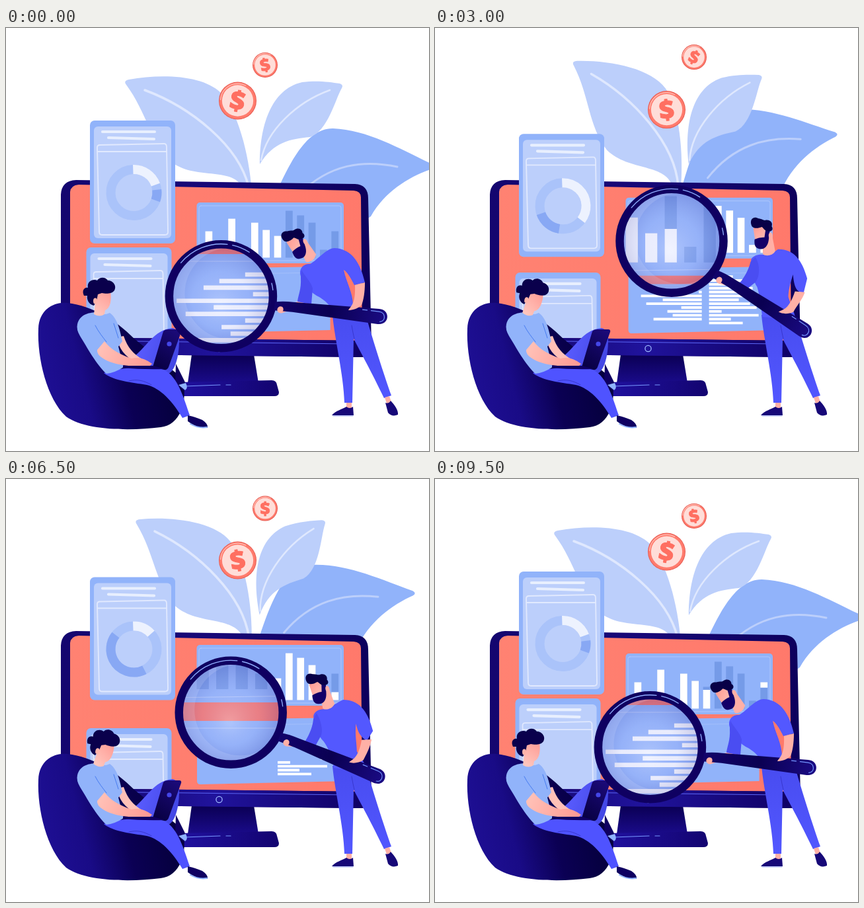
An HTML page with a canvas that plays this animation: 640x640 px, repeating every 9.57 s.

```html
<!DOCTYPE html>
<html lang="en">
<head>
<meta charset="utf-8">
<title>Data research</title>
<style>
html, body { margin: 0; width: 100%; height: 100%; overflow: hidden; background: #fff; }
canvas { display: block; width: 100%; height: 100%; }
</style>
</head>
<body>
<canvas id="stage" width="640" height="640"></canvas>
<script>
const ctx = document.getElementById('stage').getContext('2d');
const LOOP = 9570, STEP = 1000 / 14;
const KEYS = [0, 1930, 3930, 5290, 6500, 8210, LOOP];
const SKY = '#91b3fa', PALE = '#bccffb', VEIN = '#dfe8fe', NAVY = '#0f0061',
  BLUE = '#4f53ff', SKIN = '#ffb0a6', DARKBAR = '#759be8';

const clamp = v => Math.max(0, Math.min(1, v));
const lerp = (a, b, q) => a + (b - a) * q;
const ramp = (t, a, b) => clamp((t - a) / (b - a));
const segment = t => { let i = 0; while (i < 5 && t >= KEYS[i + 1]) i++; return i; };

function linear(t, v) {
  const i = segment(t);
  return lerp(v[i], v[i + 1], ramp(t, KEYS[i], KEYS[i + 1]));
}

// Periodic monotone cubic through six values, one for each key time
function ease(t, v) {
  const i = segment(t), at = k => v[(k + 6) % 6];
  const slope = k => { k = (k + 6) % 6; return (at(k + 1) - at(k)) / (KEYS[k + 1] - KEYS[k]); };
  const tangent = k => {
    const a = slope(k - 1), b = slope(k);
    return a * b <= 0 ? 0 : 2 * a * b / (a + b);
  };
  const h = KEYS[i + 1] - KEYS[i], s = (t - KEYS[i]) / h, r = 1 - s;
  return at(i) * r * r * (1 + 2 * s) + at(i + 1) * s * s * (3 - 2 * s)
    + h * s * r * (tangent(i) * r - tangent(i + 1) * s);
}

function fill(d, color) { ctx.fillStyle = color; ctx.fill(new Path2D(d)); }
function stroke(d, color, width = 2) {
  ctx.strokeStyle = color; ctx.lineWidth = width; ctx.lineCap = ctx.lineJoin = 'round';
  ctx.stroke(new Path2D(d));
}
function rect(x, y, w, h, color, r = 0) {
  ctx.fillStyle = color; ctx.beginPath(); ctx.roundRect(x, y, w, h, r); ctx.fill();
}
function frame(x, y, w, h, color, width, r) {
  ctx.strokeStyle = color; ctx.lineWidth = width;
  ctx.beginPath(); ctx.roundRect(x, y, w, h, r); ctx.stroke();
}
function disc(x, y, r, color, ry = r, turn = 0) {
  ctx.fillStyle = color; ctx.beginPath(); ctx.ellipse(x, y, r, ry, turn, 0, 7); ctx.fill();
}
function group(draw) { ctx.save(); draw(); ctx.restore(); }
function turned(x, y, degrees, draw) {
  group(() => {
    ctx.translate(x, y); ctx.rotate(degrees * Math.PI / 180); ctx.translate(-x, -y); draw();
  });
}
function shade(x0, y0, x1, y1, ...colors) {
  const g = ctx.createLinearGradient(x0, y0, x1, y1);
  colors.forEach((c, i) => g.addColorStop(i / (colors.length - 1), c));
  return g;
}
// Blend of two paths that share a structure
function mix(a, b, q) {
  const other = b.split(' ');
  return a.split(' ').map((s, i) => isNaN(s) ? s : lerp(+s, +other[i], q)).join(' ');
}

function leaves(t) {
  const p = ease(t, [0, .47, 1, .9, .62, .17]);
  group(() => {
    ctx.translate(-25 * p, -22 * p);
    turned(400, 340, -9 * p, () => {
      fill('M400 270C425 212 452 151 495 152C548 154 600 185 645 206Q651 210 645 213C612 224 574 246 552 285L470 340Z', SKY);
      stroke('M592 210C540 199 490 206 445 250', PALE, 3);
    });
  });
  turned(375, 245, ease(t, [0, 2.9, 13.4, 11.8, 5.4, 0]), () => {
    fill('M186 78C235 69 298 71 325 98C350 125 368 190 372 248L360 245C345 208 290 231 252 204C218 172 213 128 182 86Q177 80 186 78Z', PALE);
    stroke('M210 94C280 120 352 178 367 240', VEIN, 3.5);
  });
  turned(383, 207, -ease(t, [0, 2.8, 10.1, 13.3, 11.4, 3.5]), () => {
    fill('M384 206C384 150 400 93 448 82C472 79 490 82 505 84Q511 86 508 91C498 108 487 156 460 165C430 168 405 172 384 206Z', PALE);
    stroke('M490 94C440 112 394 155 386 200', VEIN, 2.5);
  });
}

function coin(x, y, r, tilt) {
  disc(x, y, r, '#e85c52');
  disc(x, y, r - 1, '#ff7b6d');
  disc(x, y, r * .83, '#ffddd8');
  ctx.strokeStyle = '#ffc0b8'; ctx.lineWidth = 1.2;
  ctx.beginPath(); ctx.arc(x, y, r * .91, 3.2, 5.2); ctx.stroke();
  turned(x, y, tilt, () => {
    ctx.fillStyle = ctx.strokeStyle = '#ff6f61';
    ctx.font = `800 ${r * 1.4}px "Open Sans", sans-serif`;
    ctx.textAlign = 'center'; ctx.textBaseline = 'alphabetic';
    ctx.lineWidth = r * .035;
    ctx.fillText('$', x, y + r * .5);
    ctx.strokeText('$', x, y + r * .5);
  });
}
function coins(t) {
  const wave = Math.cos(t / LOOP * 4 * Math.PI);
  coin(350.5, 118 - 8 * wave, 28.5, ease(t, [11, 1, -10, -12, -10, 5]));
  coin(392, 49 + 7 * wave, 19, ease(t, [-13, 10, 30, 20, 0, -12]));
}

function monitor() {
  fill('M281 494H375L382 537H275Z', shade(0, 496, 0, 537, '#0b0056', '#1a0b8a'));
  fill('M262 536L402 533Q409 533 410 540L413 551Q413 557 406 557H262Z', shade(262, 0, 412, 0, '#2011a0', '#130470'));
  stroke('M270 542L324 540M333 540H340', '#7799ff', 1.2);
  fill('M83 252Q84 231 106 230L528 236Q548 237 548 258L553 481Q552 498 536 498L83 493Z',
    shade(84, 0, 552, 0, '#14066f', '#170878', '#0d005c'));
  fill('M97 248Q98 238 110 237L526 246Q537 247 537 256L539 473L97 468Z', shade(97, 350, 539, 350, '#ff8272', '#ff796b'));
  fill('M97 468L539 473L553 480Q552 498 536 498L83 493V472Z', shade(84, 0, 550, 0, '#110263', '#20139c', '#0f0062'));
  stroke('M198 474L520 478', '#5b65f4', 1.1);
  ctx.strokeStyle = '#9eb9ff'; ctx.lineWidth = 1.3;
  ctx.beginPath(); ctx.arc(322.5, 485, 4.6, 0, 7); ctx.stroke();
}

const BAR_HEIGHTS = [40, 26, 59, 14, 53, 42, 33, 71, 64, 53, 12, 40];
function bars(t, base) {
  const filled = linear(t, [7, 11.8, 16.86, 20.25, 23.3, 28.33, 31]);
  const emptied = linear(t, [0, 5.5, 9.3, 13.58, 17.9, 20, 24]);
  BAR_HEIGHTS.forEach((h, i) => {
    const x = 301.5 + 17.35 * i;
    rect(x, base - h, 10.8, h, DARKBAR);
    for (let pos = i; pos < 36; pos += 12) {
      const top = clamp(filled - pos), bottom = clamp(emptied - pos);
      if (top > bottom) rect(x, base - h * top, 10.8, h * (top - bottom), '#fff');
    }
  });
}

const LEFT_ROWS = [0, 31, 54, 68, 24, 92, 59, 84, 31, 52, 44, 73];
const RIGHT_ROWS = [36, 55, 60, 66, 50, 53, 45, 62, 72, 19, 75, 33, 51];
const ROW_TOP = 374.2, ROW_GAP = 5.85, ROW_HEIGHT = 3.9;
function rows(t, x) {
  const second = t > 6000;
  const leftIn = second ? 7.7 * ramp(t, 6900, 8210) + 5 * ramp(t, 8210, 9250) : t < 850 ? 13 : 13 * ramp(t, 850, 2350);
  const leftOut = second ? 0 : t < 850 ? 13 * ramp(t, 60, 800) : 13 * ramp(t, 2500, 3850);
  const rightIn = 13 * ramp(t, 1150, 2700);
  const rightOut = t < 5290 ? 5.9 * ramp(t, 4050, 5290) : 5.9 + 7.1 * ramp(t, 5290, 8150);
  LEFT_ROWS.forEach((w, k) => {
    const on = clamp(leftIn - k) - clamp(leftOut - k);
    if (on > 0) rect(x + 111 - w * on, ROW_TOP + ROW_GAP * k, w * on, ROW_HEIGHT, '#fff');
  });
  RIGHT_ROWS.forEach((w, k) => {
    const on = clamp(rightIn - k), off = clamp(rightOut - k);
    if (on > off) rect(x + 122 + w * off, ROW_TOP + ROW_GAP * k, w * (on - off), ROW_HEIGHT, '#fff');
  });
}

function panels(t, top, x) {
  rect(288.5, top, 222.5, 92, SKY, 5);
  frame(292, top + 5, 215, 83, '#b7ccfc', .8, 3);
  bars(t, top + 83.5);
  fill(`M${x + 5} 364L${x + 226} 361V457L${x + 5} 462Q${x} 462 ${x} 457V369Q${x} 364 ${x + 5} 364Z`, SKY);
  stroke(`M${x + 4} 373L${x + 222} 370`, '#a9c2fc', .8);
  rows(t, x);
}

function card(x, y, h) {
  rect(x, y, 129, h, SKY, 7);
  rect(x + 6, y + 9, 117, h - 17, PALE, 6);
  stroke(`M${x + 19} ${y + 17}H${x + 98}M${x + 28} ${y + 26}L${x + 97} ${y + 28}`, '#e8effe', 4.2);
  stroke(`M${x + 15} ${y + 37}L${x + 112} ${y + 35}Q${x + 116} ${y + 35} ${x + 116} ${y + 40}L${x + 118} ${y + h - 17}Q${x + 118} ${y + h - 13} ${x + 113} ${y + h - 13}H${x + 18}Q${x + 14} ${y + h - 13} ${x + 14} ${y + h - 18}L${x + 11} ${y + 41}Q${x + 11} ${y + 37} ${x + 15} ${y + 37}ZM${x + 11} ${y + 47}H${x + 116}`, '#e1e9fe', 1.8);
}
function donut(x, y, t) {
  const arc = (a, b, color) => {
    const rad = d => (d - 92) * Math.PI / 180;
    ctx.strokeStyle = color; ctx.lineWidth = 14; ctx.lineCap = 'butt';
    ctx.beginPath(); ctx.arc(x, y, 35, rad(a), rad(b)); ctx.stroke();
  };
  disc(x, y, 28, PALE);
  arc(0, 360, '#aac3fa');
  arc(0, ease(t, [72, 175, 75, 35, 50, 70]), '#edf2fe');
  arc(ease(t, [85, 270, 115, 95, 155, 117]), ease(t, [112, 320, 175, 125, 310, 177]), '#88a8f4');
}
function cards(t) {
  group(() => {
    ctx.beginPath(); ctx.rect(97, 240, 200, 229); ctx.clip();
    card(121.5, ease(t, [332, 352, 383, 390, 377, 344]), 185);
  });
  const y = ease(t, [140, 155, 162.5, 157.5, 148.5, 141]);
  card(127, y, 186);
  donut(193.5, y + 109, t);
}

function lens(t, cx, cy, panelX) {
  const base = ease(t, [300, 354, 355, 335, 318, 300]);
  const low = ease(t, [342, 388, 386, 370, 366, 344]);
  group(() => {
    ctx.beginPath(); ctx.arc(cx, cy, 74, 0, 7); ctx.clip();
    rect(cx - 80, cy - 80, 160, 160, SKY);
    rect(cx - 80, base + 20, 160, low - base - 20, '#ff7062');
    stroke(`M240 ${base + 13}L460 ${base + 10}M240 ${low + 11}H460`, PALE, 1);
    group(() => {
      ctx.translate(-224, base); ctx.scale(1.7, 1.7); bars(t, 0);
    });
    group(() => {
      ctx.translate(-224, low + 21 - 1.7 * (ROW_TOP + ROW_HEIGHT / 2)); ctx.scale(1.7, 1.7); rows(t, panelX);
    });
    const glass = ctx.createRadialGradient(cx - 2, cy + 14, 4, cx, cy, 74);
    glass.addColorStop(0, 'rgba(215,222,255,.38)');
    glass.addColorStop(.55, 'rgba(165,175,245,.24)');
    glass.addColorStop(1, 'rgba(80,85,185,.3)');
    disc(cx, cy, 74, glass);
    ctx.fillStyle = 'rgba(225,230,255,.16)';
    ctx.beginPath(); ctx.arc(cx, cy, 74, 0, 7); ctx.arc(cx + 14, cy - 4, 69, 0, 7, true); ctx.fill('evenodd');
  });
  ctx.strokeStyle = NAVY; ctx.lineWidth = 12.5;
  ctx.beginPath(); ctx.arc(cx, cy, 78.5, 0, 7); ctx.stroke();
  ctx.strokeStyle = '#8fb0ff'; ctx.lineWidth = 1.3; ctx.lineCap = 'round';
  for (const [a, b] of [[-2.45, -1.45], [-1.35, -1], [-.25, -.12]]) {
    ctx.beginPath(); ctx.arc(cx, cy, 79, a, b); ctx.stroke();
  }
}

function legs() {
  fill('M494 434L543 430C556 475 572 525 583 556L572 560C553 520 535 488 526 470L524 567H512C511 525 497 470 494 434Z',
    shade(0, 435, 0, 565, '#484cf0', '#5257ff'));
  stroke('M523 450Q525 462 527 470', '#3938cf', 1);
  fill('M515 567H523V575H515ZM573 559L580 557L583 566L576 568Z', SKIN);
  fill('M493 586C499 579 508 577 515 573Q520 577 525 573L526 586Z', '#170878');
  fill('M574 567Q579 569 582 564C588 570 594 579 593 585Q584 589 578 582Z', '#170878');
  stroke('M495 587H525', '#7b8fff', .8);
}

function standingMan(q, cx, cy, angle) {
  legs();
  stroke(mix('M 452 415 L 416 427', 'M 470 389 L 433 376', q), SKIN, 9);
  fill(mix('M 445 372 C 444 362 452 356 460 357 C 470 352 485 333 497 333 C 520 334 535 350 543 385 L 527 389 C 520 375 515 368 511 366 C 515 385 525 400 525 420 L 546 436 C 530 445 510 440 497 437 C 494 420 480 410 470 405 C 458 398 447 385 445 372 Z',
    'M 483 347 C 486 342 495 340 502 341 C 507 343 518 340 522 335 C 545 334 558 350 566 378 L 562 403 C 552 402 548 400 546 374 C 539 392 536 400 536 405 L 543 432 C 530 440 510 438 495 437 C 493 420 492 400 490 390 C 484 380 482 360 483 347 Z', q), '#5358ff');
  fill(mix('M 447 366 C 452 375 462 385 464 394 L 462 418 L 441 414 C 442 404 447 396 446 378 Z',
    'M 490 344 C 498 355 496 375 488 383 L 473 392 L 462 384 C 470 376 478 364 482 350 Z', q), '#4a4df2');
  group(() => {
    ctx.translate(lerp(446, 505, q), lerp(333, 318, q));
    ctx.rotate(lerp(-28, 0, q) * Math.PI / 180);
    ctx.translate(-505, -318);
    fill('M503 320L518 314L521 337C516 344 506 344 502 340Z', SKIN);
    fill('M490 300L507 296L510 322H492Z', shade(490, 300, 508, 322, '#ff9c93', '#ffc1b8'));
    fill('M491 317Q499 314 506 315L509 301L515 304L512 320C510 329 504 335 495 331C490 329 490 322 491 317Z', '#130068');
    disc(515.5, 313, 3, SKIN, 5);
    fill('M488 297C484 286 492 281 499 286C505 287 506 290 510 289C518 289 520 295 518 299C521 304 517 308 512 306C506 305 506 301 503 299C497 301 491 301 488 297Z', '#080047');
  });
  group(() => {
    ctx.translate(cx, cy); ctx.rotate(angle);
    fill('M82 -1C90 -3 100 -4 110 -4L240 -9C257 -10 259 14 240 14L110 11L82 12Z', shade(82, 0, 250, 0, '#12036b', '#0a0052', '#1a0a82'));
    stroke('M215 -5H222M228 -5H240C251 -5 252 9 243 10', '#7396ff', 1.2);
  });
  disc(lerp(415, 432, q), lerp(426, 375, q), 4.5, SKIN, 5, .6);
  fill(mix('M 528 389 L 543 385 C 543 400 541 412 538 419 C 532 425 524 427 518 427 C 522 420 529 418 528 389 Z',
    'M 547 400 L 562 402 C 558 412 548 422 543 431 C 536 434 526 434 520 430 C 528 426 536 428 547 400 Z', q), SKIN);
}

function sittingMan(t) {
  fill('M49 455C50 426 72 414 93 416C132 421 165 441 194 470L267 530C276 566 263 601 234 604C188 610 120 609 91 588C62 561 47 500 49 455Z',
    shade(55, 545, 235, 500, '#1e0f94', '#190b86', '#0b0054', '#060040'));
  fill('M257 508L270 534Q275 545 268 548L256 538Z', NAVY);
  fill('M261 540L272 537Q276 545 271 548Z', '#8fb3ff');
  fill('M190 500C212 485 223 456 252 454Q263 456 262 476C261 505 253 520 246 523L190 514Z', shade(195, 490, 260, 510, '#5a5dff', '#4145e3'));
  fill('M148 522C175 511 216 514 237 516C258 526 266 550 278 586L267 590C252 565 234 545 213 540C190 536 163 534 148 522Z', BLUE);
  stroke('M186 534C198 531 208 533 220 540', '#3937cd', 1);
  fill('M275 586Q285 588 297 593Q306 599 305 605Q289 606 275 595Z', NAVY);
  stroke('M279 599Q291 606 304 604', '#8fb3ff', 2);
  fill('M168 468L178 466C184 484 193 493 206 501L197 506C180 497 170 485 168 468Z', '#ffc0b7');
  fill('M108 448C112 433 125 431 135 430Q147 436 157 431C169 439 173 460 176 474L170 482L178 513Q164 522 152 523C137 510 122 482 112 466Q106 456 108 448Z', SKY);
  stroke('M135 450C140 460 146 467 152 475M163 447L170 469', '#477cf0', 1);
  fill('M149 474C158 486 172 494 190 500Q205 496 221 508L216 513C192 512 164 511 147 500Q137 494 138 487Z', shade(140, 480, 215, 510, '#ffc2b8', '#ff9b94'));
  fill('M238 459Q240 456 246 456H262Q266 456 265 460L246 513Q244 518 239 517L222 513Z', shade(225, 510, 260, 460, '#080044', '#1b0a78'));
  fill('M177 511L223 511L240 516Q205 517 177 514Z', NAVY);
  disc(247, 478, 3.6, '#4446e8');
  const nod = t < 5000 ? ramp(t, 2300, 3000) : 1 - ramp(t, 8500, 9200);
  turned(143, 428, 12 * nod, () => {
    fill('M133 402L158 398C160 412 158 424 150 427L149 433Q142 438 133 433L135 416Z', shade(135, 432, 156, 402, '#ffc7be', '#ff9f98'));
    fill('M118 405C114 397 119 392 124 393C122 383 132 379 138 382C142 376 151 377 154 382C162 382 168 390 164 397C160 403 150 402 145 401L139 403L137 413L133 420C125 418 122 411 123 405Z', '#0a004c');
    disc(135, 413, 3, '#ffb4aa', 4.5);
  });
}

function draw(t) {
  ctx.fillStyle = '#fff'; ctx.fillRect(0, 0, 640, 640);
  const q = ease(t, [0, 1, .717, .58, .53, .015]);
  const angle = (6.75 + 30.45 * q) * Math.PI / 180;
  const cx = 530 - 206 * Math.cos(angle), cy = 430 + 6.5 * q - 206 * Math.sin(angle);
  const panelX = ease(t, [264.6, 279, 300, 299.5, 289, 271.6]);
  leaves(t);
  coins(t);
  monitor();
  panels(t, ease(t, [264, 250, 262, 260, 251, 256]), panelX);
  cards(t);
  sittingMan(t);
  lens(t, cx, cy, panelX);
  standingMan(q, cx, cy, angle);
}

const start = performance.now();
function tick() {
  const t = (performance.now() - start) % LOOP;
  draw(Math.min(LOOP, Math.floor(t / STEP + .1) * STEP));
  requestAnimationFrame(tick);
}
tick();
</script>
</body>
</html>
```
